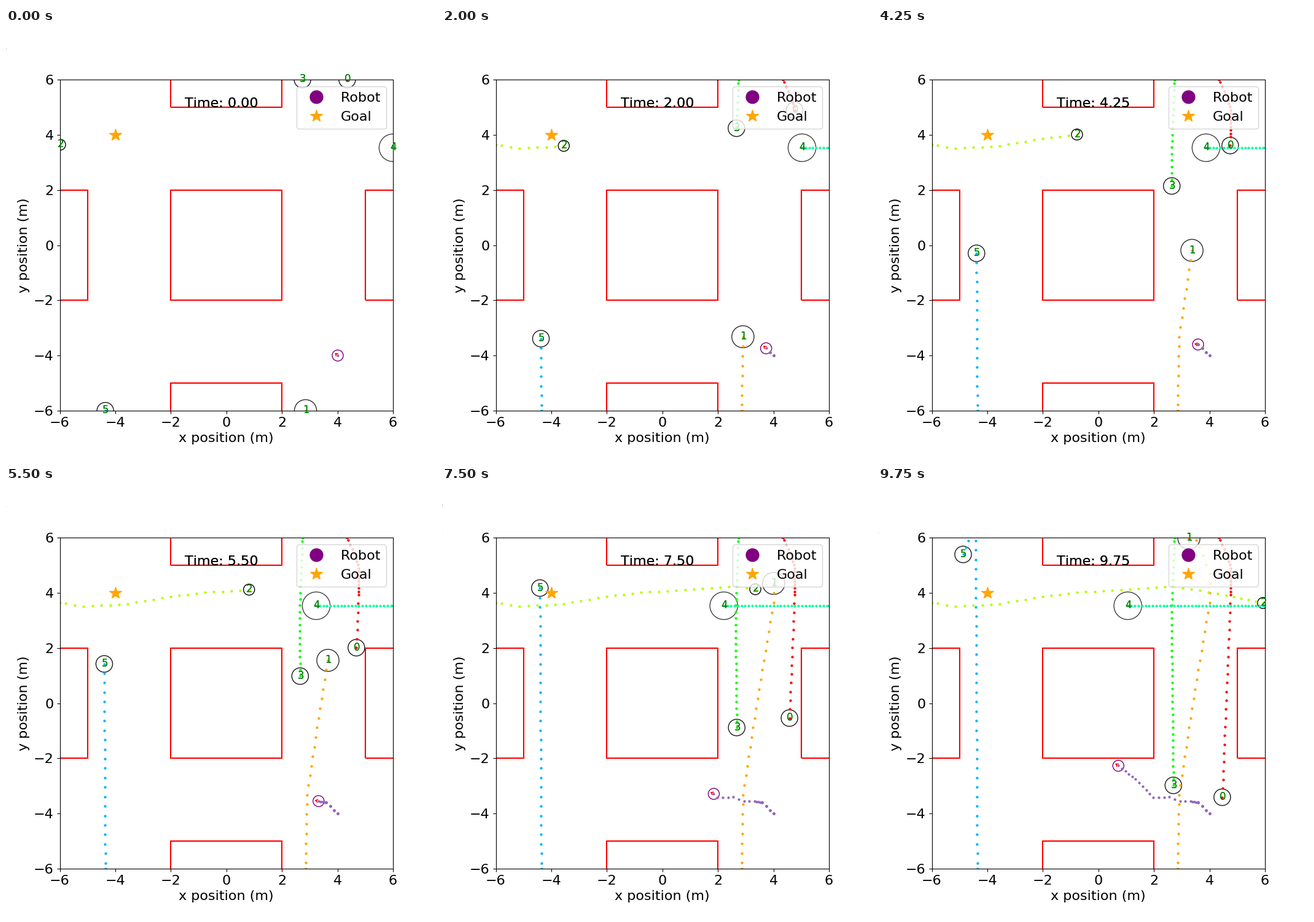
Animation of 700 by 700 pixels, one loop 10 s. Source, as a matplotlib script:

```python
import numpy as np
import matplotlib.pyplot as plt
from matplotlib import colormaps
from matplotlib.animation import FuncAnimation
from matplotlib.patches import ArrowStyle, Circle, FancyArrowPatch, Rectangle

plt.rcParams["text.kerning_factor"] = 6  # whole-pixel kerning

STEPS = 40
DT = 0.25
START = 0.4  # steps lost getting up to speed
FONT = 16
steps = np.arange(STEPS)


def walk(*keys):
    """Straight legs at steady speed between (step, x, y) turning points."""
    k, x, y = np.array(keys, float).T
    k[0] = START
    return np.column_stack([np.interp(steps, k, x), np.interp(steps, k, y)])


walkers = [
    walk((0, 4.35, 6), (5, 4.67, 5.25), (8, 4.76, 4.89), (16, 4.76, 3.93),
         (22, 4.68, 2.01), (39, 4.46, -3.41)),
    walk((0, 2.85, -6), (8, 2.9, -3.32), (17, 3.37, -0.19), (28, 4, 3.64),
         (31, 4.01, 4.69), (34, 3.63, 5.67), (37, 3.28, 6.36), (39, 3.26, 5.98)),
    walk((0, -5.99, 3.64), (3, -5.14, 3.5), (8, -3.55, 3.6), (13, -2, 3.86),
         (17, -0.77, 4.01), (28, 2.72, 4.24), (34, 4.6, 3.91), (39, 5.93, 3.63)),
    walk((0, 2.74, 6), (12, 2.63, 3.31), (39, 2.7, -2.98)),
    walk((0, 6, 3.53), (39, 1.06, 3.53)),
    walk((0, -4.36, -6), (35, -4.42, 5.89), (36, -4.5, 6.13),
         (37, -4.69, 5.89), (39, -4.87, 5.39)),
]
radii = [0.3, 0.4, 0.2, 0.3, 0.5, 0.3]

robot = walk((0, 4.01, -4), (12, 3.59, -3.6), (18, 3.59, -3.6), (22, 3.32, -3.55),
             (24, 2.94, -3.55), (26, 2.56, -3.4), (29, 1.98, -3.42),
             (34, 1.34, -2.76), (39, 0.72, -2.27))
# while it waits for a gap, the robot only edges on at every fourth step
robot[:12] = robot[steps[:12] // 4 * 4]
travel = robot[np.minimum(steps + 4, STEPS - 1)] - robot[np.maximum(steps - 4, 0)]
facing = travel / np.hypot(*travel.T)[:, None]

fig, ax = plt.subplots(figsize=(7, 7), dpi=100)
ax.set_xlim(-6, 6)
ax.set_ylim(-6, 6)
ax.tick_params(labelsize=FONT)
ax.set_xlabel("x position (m)", fontsize=FONT)
ax.set_ylabel("y position (m)", fontsize=FONT)

# a block in the middle and one at each side
for cx, cy in [(0, 0), (0, 7), (0, -7), (7, 0), (-7, 0)]:
    ax.add_patch(Rectangle((cx - 2, cy - 2), 4, 4, fill=False, ec="red", lw=1.5))

goal, = ax.plot([-4], [4], "*", color="orange", ms=15)
robot_key, = ax.plot([], [], "o", color="purple", ms=15)
ax.legend([robot_key, goal], ["Robot", "Goal"], fontsize=FONT, loc="upper right")


def add_ring(radius, color, alpha=1):
    return ax.add_patch(Circle((0, 0), radius, fill=False, ec=color, alpha=alpha))


def add_trail(color):
    return ax.scatter([], [], s=9.5, color=[color], linewidths=0)


def add_text(x, y, text="", **style):
    """Two copies on top of each other give the heavier strokes."""
    return [ax.text(x, y, text, **style) for _ in range(2)]


rings = [add_ring(r, "black", 1.15 - 0.8 * r) for r in radii]
labels = [add_text(0, 0, str(i), color="green", fontsize=12)
          for i in range(len(walkers))]
robot_ring = add_ring(0.2, "purple")
arrow = ax.add_patch(FancyArrowPatch(
    (0, 0), (1, 1), color="red",
    arrowstyle=ArrowStyle("->", head_length=2.5, head_width=1.8)))
trails = [add_trail(colormaps["hsv"](i / 9)) for i in range(len(walkers))]
robot_trail = add_trail("tab:purple")
clock = add_text(-1.5, 5, fontsize=FONT)

# two readouts whose last digit just reaches in at the left edge
values = np.random.default_rng(4).random((STEPS, 2))
readouts = [ax.text(-8.98, y, "", fontsize=FONT) for y in (7, 6)]


def draw(i):
    for path, ring, label, trail in zip(walkers, rings, labels, trails):
        x, y = path[i]
        ring.center = x, y
        for text in label:
            text.set_position((x - 0.1, y - 0.1))
        trail.set_offsets(path[:i + 1])
    robot_ring.center = robot[i]
    arrow.set_positions(robot[i], robot[i] + 0.2 * facing[i])
    robot_trail.set_offsets(robot[:i + 1])
    for text in clock:
        text.set_text(f"Time: {i * DT:.2f}")
    for readout, value in zip(readouts, values[i]):
        readout.set_text(f"{value:.2f}")


anim = FuncAnimation(fig, draw, frames=STEPS, interval=250, repeat=True,
                     repeat_delay=0, init_func=lambda: draw(0))
plt.show()
```
